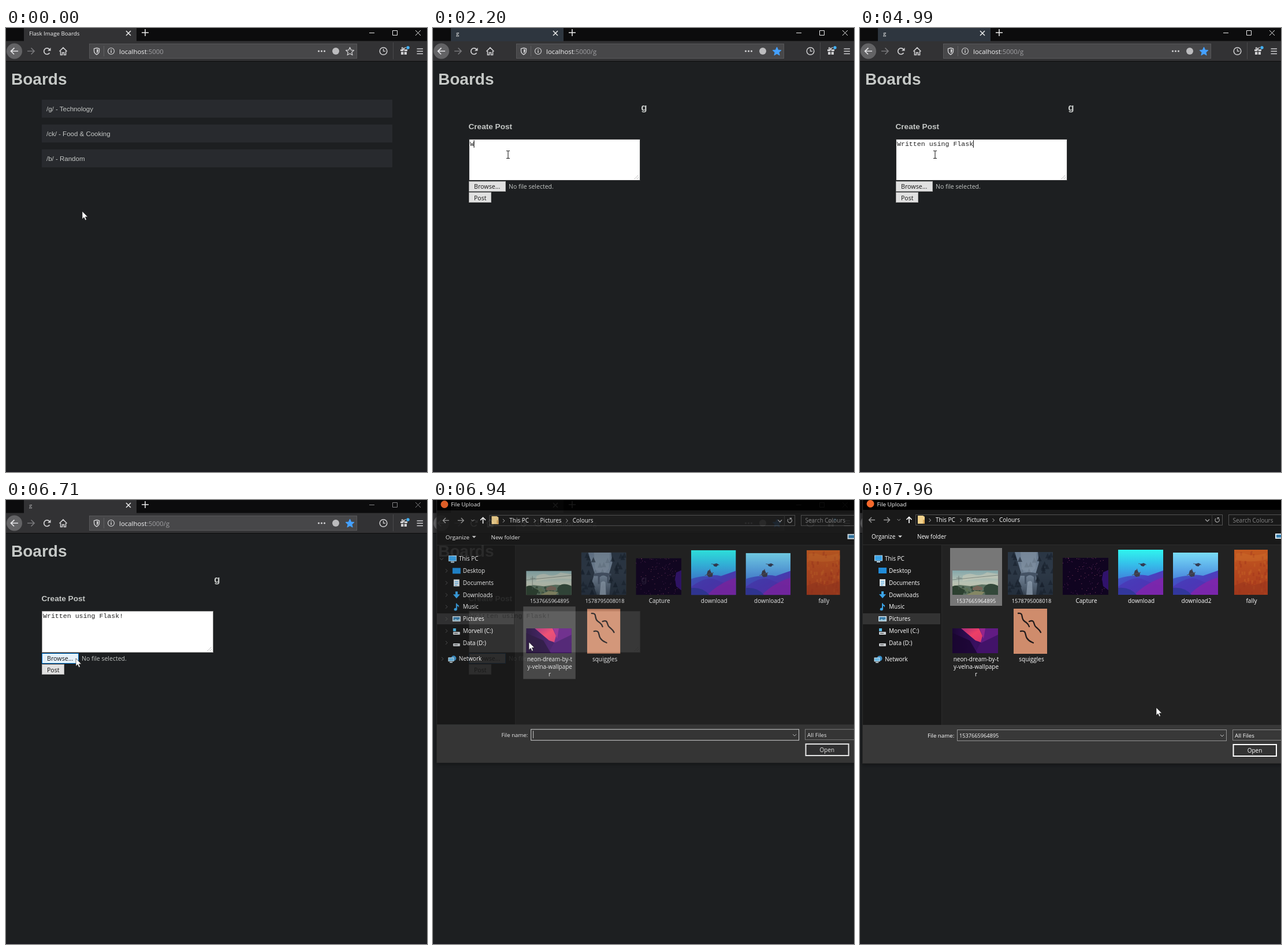
These frames come from a looping animation (729x768 px, 8000 ms). An HTML page:

```html
<!DOCTYPE html>
<html lang="en">
<head>
<meta charset="utf-8">
<title>Image boards</title>
<style>
html, body { margin: 0; width: 100%; height: 100%; overflow: hidden; background: #1d1f21; }
svg { display: block; width: 729px; height: 768px; }
svg svg { width: auto; height: auto; }
text { white-space: pre; }
.ui { font-family: "Open Sans", "Noto Sans", sans-serif; }
.page { font-family: "Liberation Sans", Arial, sans-serif; }
.mono { font-family: "Liberation Mono", "Courier New", monospace; }
</style>
</head>
<body>
<svg id="stage" viewBox="0 0 729 768"></svg>
<script>
const LOOP = 8000;
const NAVIGATE = 720, FOCUS = 1290, BROWSE = 6640, DIALOG = 6850, PRESS = 7560, CHOSEN = 7680;
const MESSAGE = "Written using Flask!";
const KEY_TIMES = [2200, 2490, 2630, 2780, 2940, 3090, 3230, 3430, 3740, 3830,
  3930, 4020, 4170, 4310, 4480, 4710, 4800, 4900, 4990, 5610];
const CHAR_WIDTH = 6.96;

// time, x, y, and whether the move arriving here is eased
const POINTER = [
  [0, 132, 317], [80, 132, 317], [540, 133, 143, 1], [880, 133, 143], [1100, 132, 209],
  [1380, 130, 219], [6020, 130, 219], [6500, 121, 274, 1], [6830, 121, 274],
  [6940, 166, 246], [7200, 192, 180], [7420, 202, 154], [7670, 202, 154], [7960, 513, 359]
];

const rect = (x, y, w, h, fill, extra = "") =>
  `<rect x="${x}" y="${y}" width="${w}" height="${h}" fill="${fill}" ${extra}/>`;
const path = (d, fill, extra = "") => `<path d="${d}" fill="${fill}" ${extra}/>`;
const line = (d, color, width = 1, extra = "") =>
  `<path d="${d}" fill="none" stroke="${color}" stroke-width="${width}" ${extra}/>`;
const circle = (x, y, r, fill, extra = "") => `<circle cx="${x}" cy="${y}" r="${r}" fill="${fill}" ${extra}/>`;
const text = (x, y, str, size, fill = "#fff", font = "ui", extra = "") =>
  `<text x="${x}" y="${y}" class="${font}" font-size="${size}" fill="${fill}" ${extra}>${str}</text>`;
const group = (id, body, extra = "") => `<g id="${id}" ${extra}>${body}</g>`;
const fade = (id, stops, dir = 'x2="0" y2="1"') => `<linearGradient id="${id}" ${dir}>` +
  stops.map((c, i) => `<stop offset="${i / (stops.length - 1)}" stop-color="${c}"/>`).join("") + "</linearGradient>";

function seeded(seed) {
  return () => (seed = (seed * 16807) % 2147483647) / 2147483647;
}

function chrome() {
  const icon = "#d0d0d2";
  return rect(0, 0, 729, 58, "#0c0c0d") + rect(0, 22.5, 729, 34.5, "#323234") +
    `<rect id="tab" x="31" y="0" width="195" height="23"/>` +
    text(40, 13, "", 9.7, "#f5f5f5", "ui", 'id="title"') +
    line("M208 5l8 8m0-8l-8 8", "#eee", 1.5) + line("M235 8h12m-6-6v12", "#eee", 1.5) +
    group("controls", line("M629 8.5h9M669.5 4.5h8v8h-8zM709 4l9 9m0-9l-9 9", "currentColor")) +
    circle(14.5, 40, 13.5, "#636365") + line("M21 40H9m5.5-5.5L8.5 40l5.5 5.5", "#e4e4e6", 1.7) +
    line("M37 40h12m-5.5-5.5l5.5 5.5-5.5 5.5", "#77777a", 1.7) +
    line("M75.5 43a5.3 5.3 0 1 1-.5-6.3", icon, 1.7) + path("M77.5 34v5.5H72z", icon) +
    line("M92.5 40.5L99 34l6.5 6.5M94.5 40v6.5h3v-4h3v4h3V40", icon, 1.6) +
    rect(144.5, 27.5, 463, 25, "#474749", 'stroke="#58585a"') +
    line("M157 34.5l4.5 1.3v3.5q0 4.5-4.5 6.7q-4.5-2.2-4.5-6.7v-3.5z", icon, 1.4) +
    path("M157 36.5l2.7.8v2.4q0 2.5-2.7 4z", icon) + line("M169.5 31v18", "#606063") +
    circle(182, 40, 5.5, "none", `stroke="${icon}" stroke-width="1.2"`) + rect(181.3, 39, 1.5, 4, icon) + rect(181.3, 36.7, 1.5, 1.5, icon) +
    `<text x="196" y="45" class="ui" font-size="11.4" fill="#f4f4f5">localhost<tspan fill="#a0a0a3">:5000<tspan id="route"></tspan></tspan></text>` +
    [541.5, 546.5, 551.5].map(x => circle(x, 40, 1.6, icon)).join("") + circle(571, 40, 6, "#bcbcbe") +
    path("M595.5 33.5l2 4.6 5 .5-3.8 3.3 1.2 4.9-4.4-2.6-4.4 2.6 1.2-4.9-3.8-3.3 5-.5z", "none", 'id="star" stroke-width="1.3" stroke-linejoin="round"') +
    circle(653.5, 40, 6.3, "none", `stroke="${icon}" stroke-width="1.5"`) + line("M653.5 36v4.2h3.5", icon, 1.3) +
    line("M670.5 25v29", "#4a4a4c") +
    path("M683 37h5.3v3H683zM689.7 37h5.3v3h-5.3zM684 41.2h4.3V46H684zM689.7 41.2h4.3V46h-4.3z", icon) +
    line("M689 37q-4.5-.5-3.5-3q2-1 3.5 3q1.5-4 3.5-3", icon, 1.3) + circle(696, 34, 2.7, "#45b1f5") +
    line("M711.5 36h10.5m-10.5 4.2h10.5m-10.5 4.2h10.5", icon, 1.5);
}

function pages() {
  const ink = "#c5c8c6", bold = 'font-weight="700"';
  const rows = ["/g/ - Technology", "/ck/ - Food &amp; Cooking", "/b/ - Random"];
  return text(9, 97.5, "Boards", 28, ink, "page", bold) + rect(0, 766, 729, 2, "#1b1b22") +
    group("index", rows.map((label, i) =>
      rect(62, 124 + i * 43, 607, 31, "#282a2e") + text(70, 144 + i * 43, label, 11.5, ink, "page")).join("")) +
    group("board",
      text(365.5, 143, "g", 17, ink, "page", bold + ' text-anchor="middle"') +
      text(61.5, 174.5, "Create Post", 13.6, ink, "page", bold) +
      rect(62.5, 192.5, 296, 71, "#fff", 'id="area"') +
      line("M349 261l7-7M353 261l3-3", "#999", 1, 'stroke-dasharray="1.5 1"') +
      text(64, 204, "", 11.6, "#222", "mono", 'id="typed"') + rect(0, 194, 1, 13, "#000", 'id="caret"') +
      rect(62.5, 265.5, 63, 17, "#e1e1e1", 'id="browse"') + text(71, 278, "Browse...", 10.7, "#111") +
      text(131, 278, "No file selected.", 10.5, ink) +
      rect(62.5, 284.5, 38, 17, "#e1e1e1", 'stroke="#adadad"') + text(71, 297.5, "Post", 10.5, "#111"));
}

function picture(x, y, w, h, body) {
  return `<svg x="${x}" y="${y}" width="${w}" height="${h}" viewBox="0 0 ${w} ${h}" style="width:${w}px;height:${h}px">${body}</svg>`;
}

function dunes(x, y, h, sky) {
  return picture(x, y, 78, h, rect(0, 0, 78, h, `url(#${sky})`) + `<g transform="translate(0 ${h - 78})">` +
    path("M0 50Q16 45 28 45Q40 42 52 45L78 36V78H0z", "url(#sand)") +
    path("M0 64Q24 46 40 50Q62 60 78 62V78H0z", "#4a35b4", 'opacity=".7"') +
    path("M28 78Q50 56 78 48V78z", "#8423ab", 'opacity=".8"') + path("M0 78V66Q20 64 32 78z", "#32379c") +
    path("M29 36l4-2 2 5 3 2-1 5-6 1-4-4z", "#3b3d4c") + line("M24 44l15-5M32 36l1-3", "#514f62", 1.1) +
    path("M38 25l6-2 4 2-4 4-4-1z", "#303950") + line("M35 24l14 2", "#414a60", 0.8) + "</g>");
}

function thumbnails() {
  const rnd = seeded(77);
  const speckle = (count, w, h, draw) =>
    Array.from({ length: count }, () => draw((rnd() * w).toFixed(1), (rnd() * h).toFixed(1))).join("");
  const stars = speckle(110, 78, 64, (x, y) => circle(x, y, 0.5, rnd() < 0.6 ? "#73306f" : "#b65a78"));
  const leaves = speckle(60, 56, 76, (x, y) => rect(x, y, 3, 6, rnd() < 0.5 ? "#a2331c" : "#c56327", 'opacity=".45"'));
  const shrubs = speckle(40, 76, 14, (x, y) => circle(x, +y + 29, 2.2, rnd() < 0.6 ? "#2b3f30" : "#5d7152", 'opacity=".7"'));
  const firs = speckle(40, 78, 66, (x, y) => path(`M${x} ${y}l4 9h-8z`, "#17202c", `opacity="${x > 22 && x < 50 ? 0.12 : 0.6}"`));
  return picture(160, 122, 79, 42,
      rect(0, 0, 79, 42, "url(#dusk)") + path("M18 9q10-6 20-2t22-4l19 3v8q-30-2-61 4z", "#d2cdb9", 'opacity=".5"') +
      path("M0 27l13-2 18 2 20-3 28 2V42H0z", "#5c7261") + shrubs +
      path("M0 28q7-5 14 2l8 4-4 8H0z", "#2c4030") + path("M24 42l16-7 16 2-5 5z", "#858764") +
      path("M35 30l8-4 9 3v5H35z", "#756558") + path("M54 31q4-8 12-8t13 4v15H58z", "#33483a") +
      line("M11 9v24M7 13h9M0 16l79-8", "#56615b", 0.6)) +
    picture(256, 90, 78, 74,
      rect(0, 0, 78, 74, "url(#mist)") + path("M22 0h28l-2 28-8 8-16-6z", "#8696a6", 'opacity=".5"') +
      path("M0 0h12l6 20 5 16-4 14 8 24H0zM78 0H52l2 18-6 20 3 16-2 20h29z", "#202b38", 'opacity=".85"') + firs +
      path("M22 37q14-4 30 0v3h-4v13h-3V43q-7-6-13 0v12h-3V41h-7z", "#445264") +
      path("M32 74l2-22q5-4 8 0l1 22z", "#93a3b3", 'opacity=".7"')) +
    picture(351, 100, 79, 64, rect(0, 0, 79, 64, "#100420") + stars + path("M70 25l9-4v35l-9-7-2-13z", "#30126b")) +
    dunes(447, 86, 78, "aqua") + dunes(542, 91, 73, "azure") +
    picture(648, 86, 58, 78, rect(0, 0, 58, 78, "url(#rust)") + leaves +
      path("M3 7q10-3 20 1t32-2v11q-24 6-52 1z", "#d37b34", 'opacity=".3"') + path("M0 62l18-7 14 7 26-8v24H0z", "#98341d", 'opacity=".5"')) +
    picture(160, 222, 79, 43,
      rect(0, 0, 79, 43, "url(#neon)") + path("M40 0h39v26L58 30 46 23z", "#611b83") +
      path("M15 0h31l6 13-3 11-9-3z", "url(#glow)") + path("M47 0h10l-3 18z", "#94258d") +
      path("M48 26l31-15v32H39z", "#421369") + path("M0 8l30 13 13 22H0z", "#190630", 'opacity=".8"')) +
    picture(266, 188, 58, 78, rect(0, 0, 58, 78, "#cf8c6c") +
      line("M8 8C18 7 12 16 18 21S25 25 27 31M27 22C37 18 34 27 38 31S45 36 47 41M12 39C23 37 19 45 23 51S30 57 34 59",
        "#211b1b", 2.3, 'stroke-linecap="round"'));
}

function sidebar() {
  const items = [["This PC", 101, 43], ["Desktop", 122, 50], ["Documents", 143, 50], ["Downloads", 164, 50], ["Music", 184.5, 50],
    ["Pictures", 205.5, 50], ["Morvell (C:)", 226.5, 50], ["Data (D:)", 247, 50], ["Network", 275, 43]];
  const blue = "#3ba4e8";
  const drive = y => rect(33, y, 12, 5, "#c9cdd0", 'rx="1"') + rect(35, y + 2, 6, 1, "#444");
  return rect(5, 196, 134, 19, "#333") +
    items.map(([label, y, x]) => text(x, y + 3.7, label, 10)).join("") +
    group("twisties", items.map(([, y, x], i) => line(i ? `M${x - 30} ${y - 3}l3 3-3 3` : `M10 ${y - 1}l3 3 3-3`, "#555")).join("")) +
    rect(25.5, 96, 13, 9, blue, 'stroke="#b8d6e8"') + rect(29, 106, 6, 2, "#b8d6e8") +
    rect(32, 117, 14, 10, "#208bd8") + rect(34, 137, 10, 12, "#dce6ea") + line("M36 141h6m-6 3h6m-6 3h4", blue) +
    path("M37 158h4v5h4l-6 7-6-7h4z", blue) +
    path("M38 179l1-1q1 3 4 4v4q-1-3-3-3v6a2.7 2.3 0 1 1-2-2.3z", blue) +
    rect(32, 201, 14, 9, "#d5e4ec") + rect(33.5, 202.5, 11, 6, "#367aa8") + path("M33.5 208.5l4-3 3 2 4-2v3z", "#9dc8d8") +
    drive(228) + rect(33, 222, 5, 5, "#54bcea") + drive(248) +
    circle(34, 274, 4.5, "#3b91ca") + rect(25, 273, 9, 6, "#68b8e4", 'stroke="#d4e4ec"') + line("M27 281h5", "#d4e4ec", 1.5);
}

function dialog() {
  const mid = 'text-anchor="middle"';
  const labels = [[201, 178, "1537665964895", 9.2], [297, 178, "1578795008018", 9.2], [392, 178, "Capture"], [487, 178, "download"],
    [582.5, 178, "download2"], [678, 178, "fally"], [201, 279, "neon-dream-by-t"], [201, 292, "y-velna-wallpape"], [201, 305, "r"], [297, 279, "squiggles"]];
  return rect(4, -20, 745, 476, "#202020", 'filter="url(#shadow)"') + rect(4, -20, 745, 37, "#000") +
    rect(4, 17, 745, 60, "#191919") + rect(4, 77, 137, 312, "#191919") + line("M141.5 77v312M4 77.5h745", "#2b2b2b") +
    rect(4, 389, 745, 66.5, "#383838") + line("M4.5-20V455", "#2d2d2d") +
    circle(18, 6.5, 6.5, "#f5682b") + text(29.5, 10.5, "File Upload", 9.8) +
    line("M26 34.5H15.5m4.5-4.5l-4.5 4.5 4.5 4.5M41 34.5h10.5m-4.5-4.5l4.5 4.5-4.5 4.5", "#999", 1.4) +
    line("M64.5 33l2.7 2.7 2.7-2.7", "#999") + line("M85 40V29.5m-4.5 4.5l4.5-4.5 4.5 4.5", "#fff", 1.7) +
    rect(96.5, 25.5, 531, 18, "#191919", 'stroke="#535353"') + line("M609.5 25v18", "#383838") +
    path("M100 27h9l3 2v12h-12z", "#f2d28c") + path("M109 34h3v7h-3z", "#dba95a") +
    [119.5, 173.5, 229.5].map(x => line(`M${x} 32l3 3-3 3`, "#bbb")).join("") +
    text(131, 38.2, "This PC", 10) + text(184.5, 38.2, "Pictures", 10) + text(241, 38.2, "Colours", 10) +
    line("M598 33.5l3.5 3.5 3.5-3.5", "#aaa", 1.2) + line("M616 32a3.7 3.7 0 1 0 4-.8M619 33.500v-3h3", "#aaa", 1.1) +
    rect(638.5, 25.5, 110, 18, "#191919", 'stroke="#535353"') + text(645.5, 38.5, "Search Colours", 10, "#858585") +
    text(20, 67, "Organize", 9.9) + path("M66 61.5h7l-3.5 3.5z", "#ddd") + text(99, 67, "New folder", 9.9) +
    rect(719, 58, 12, 9, "#d9e7ef") + rect(721, 60, 10, 5, "#347dae") + sidebar() +
    rect(155, 184, 91, 126, "#4d4d4d", 'id="hover"') + rect(156, 83, 90, 100, "#777", 'id="chosen"') +
    thumbnails() + labels.map(([x, y, label, size = 10]) => text(x, y, label, size, "#fff", "ui", mid)).join("") +
    text(117, 411, "File name:", 9.7) + rect(168.5, 397.5, 466, 19, "#383838", 'id="field"') +
    line("M624 406l3 3 3-3", "#ccc") + rect(172, 400, 1, 13, "#ddd", 'id="fieldCaret"') +
    text(172, 411, "1537665964895", 9.2, "#fff", "ui", 'id="fileName"') +
    rect(645.5, 397.5, 100, 18, "#383838", 'stroke="#888"') + text(649, 411, "All Files", 9.8) +
    rect(646.5, 423, 74.5, 20, "#333", 'stroke="#fff" stroke-width="2"') + text(683.5, 437, "Open", 10, "#fff", "ui", mid);
}

const cursors =
  group("arrow", path("M0 0V13.5L3.1 10.6 5.2 15.5 7.4 14.5 5.3 9.8H9.6z", "#fff", 'stroke="#111" stroke-width=".6"')) +
  group("ibeam", line("M-3-6.5h2q1 0 1 1v11q0 1-1 1h-2M3-6.5H1q-1 0-1 1M3 6.5H1q-1 0-1-1", "#222", 1.1)) +
  group("hand", path("M-1 1q1-2 2.5 0v5l6 1.5q2 1 1 4l-1.5 4H0l-4-6q0-2 3 0z", "#fff", 'stroke="#111" stroke-width=".8"'));

const stage = document.getElementById("stage");
stage.innerHTML = "<defs>" +
  fade("dusk", ["#84a7aa", "#b9c3b4", "#b9b59c"]) + fade("mist", ["#65778b", "#76879a", "#3b4858"]) +
  fade("aqua", ["#2ff5ee", "#35bdea", "#3f82dc", "#3f6ad0"]) + fade("azure", ["#79dcf6", "#5eb0ea", "#4782da", "#4367cc"]) +
  fade("sand", ["#3b66cc", "#4a3fbe", "#7a24a8"], 'x2="1" y2="1"') + fade("rust", ["#c45a20", "#b5481f", "#ab3f1d"]) +
  fade("neon", ["#1b0735", "#3a1061", "#2b0b4c"], 'x2="1" y2="0"') + fade("glow", ["#a62a78", "#ee3f66", "#d8376f"], 'x2="1" y2="1"') +
  '<filter id="shadow" x="-5%" y="-5%" width="110%" height="110%"><feDropShadow dx="0" dy="2" stdDeviation="3" flood-opacity=".4"/></filter></defs>' +
  rect(0, 0, 729, 768, "#1d1f21") + chrome() + pages() + group("dialog", dialog()) + group("pointer", cursors);

const el = Object.fromEntries([...stage.querySelectorAll("[id]")].map(node => [node.id, node]));
const set = (id, values) => Object.entries(values).forEach(([key, value]) => el[id].setAttribute(key, value));
const show = (id, on) => set(id, { visibility: on ? "visible" : "hidden" });

function pointerAt(t) {
  const i = POINTER.findIndex(key => key[0] > t);
  if (i < 0) return POINTER[POINTER.length - 1].slice(1, 3);
  const [t0, x0, y0] = POINTER[i - 1], [t1, x1, y1, eased] = POINTER[i];
  let k = (t - t0) / (t1 - t0);
  if (eased) k = k * k * (3 - 2 * k);
  return [x0 + (x1 - x0) * k, y0 + (y1 - y0) * k];
}

function render(t) {
  const onBoard = t >= NAVIGATE, active = t < BROWSE, open = t >= DIALOG;
  const [x, y] = pointerAt(t);
  const over = (left, top, right, bottom) => x >= left && x <= right && y >= top && y <= bottom;

  el.title.textContent = onBoard ? "g" : "Flask Image Boards";
  el.route.textContent = onBoard ? "/g" : "";
  set("title", { fill: active ? "#f5f5f5" : "#b5b5b7" });
  set("tab", { fill: onBoard && active ? "#2e363f" : "#323234" });
  set("controls", { color: active ? "#eee" : "#858587" });
  set("star", { fill: onBoard ? "#45a1ff" : "none", stroke: onBoard ? "#45a1ff" : "#d0d0d2" });
  show("index", !onBoard);
  set("board", { display: onBoard ? "inline" : "none" });

  const typed = KEY_TIMES.filter(time => time <= t).length;
  const lastKey = typed ? KEY_TIMES[typed - 1] : FOCUS;
  el.typed.textContent = MESSAGE.slice(0, typed);
  set("caret", { x: 63.6 + typed * CHAR_WIDTH });
  show("caret", t >= FOCUS && active && (t - lastKey) % 1000 < 500);

  const overArea = onBoard && !open && over(62, 192, 359, 264);
  const overBrowse = onBoard && over(63, 265, 126, 283);
  set("area", { stroke: overArea ? "#3a3b3c" : "#9a9a9a" });
  set("browse", { fill: overBrowse ? "#e5f1fb" : "#e1e1e1", stroke: overBrowse || !active ? "#0078d7" : "#adadad" });

  // the dialog grows and fades in
  const left = 1 - Math.min(1, Math.max(0, (t - DIALOG) / 170));
  const rest = left ** 3, scale = 1 - 0.045 * rest;
  set("dialog", {
    display: open ? "inline" : "none", opacity: 1 - rest,
    transform: `translate(430 230) scale(${scale}) translate(-430 -230)`
  });
  const pressed = t >= PRESS;
  show("twisties", open && t < 7150);
  show("hover", over(155, 184, 246, 310));
  show("chosen", pressed || over(156, 83, 246, 183));
  set("chosen", { fill: pressed ? "#777" : "#4d4d4d" });
  set("field", { stroke: pressed ? "#929292" : "#e5e5e5" });
  show("fieldCaret", !pressed && (t - DIALOG) % 1000 < 500);
  show("fileName", t >= CHOSEN);

  const hand = !onBoard && over(62, 124, 669, 155);
  set("pointer", { transform: `translate(${x} ${y})` });
  show("ibeam", overArea);
  show("hand", hand);
  show("arrow", !overArea && !hand);
}

const start = performance.now();
function tick() {
  render((performance.now() - start) % LOOP);
  requestAnimationFrame(tick);
}
tick();
</script>
</body>
</html>
```
